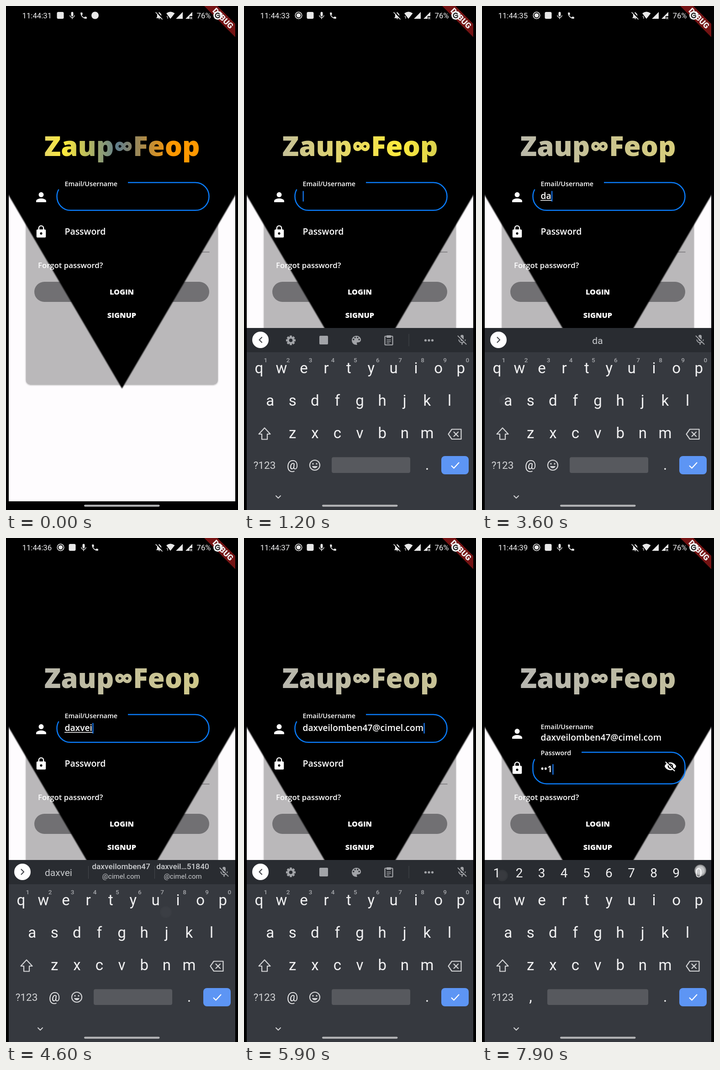
An HTML page for the animation above (8 s loop, 508x1102 px).

```html
<!DOCTYPE html>
<html lang="en">
<head>
<meta charset="utf-8">
<title>Login form</title>
<style>
html, body { margin: 0; width: 100%; height: 100%; overflow: hidden; background: #000; }
svg { display: block; width: 508px; height: 1102px; }
text { white-space: pre; }
.open { font-family: "Open Sans", sans-serif; font-weight: 600; fill: #fff; }
.robo { font-family: Roboto, sans-serif; fill: #f1f1f2; }
.mid { text-anchor: middle; }
.line { fill: none; stroke-linecap: round; stroke-linejoin: round; }
</style>
</head>
<body>
<svg id="stage" viewBox="0 0 508 1102" xmlns="http://www.w3.org/2000/svg"></svg>
<script>
const LOOP = 8000, LETTERS = 'daxvei', USER = 'daxveilomben47', HOST = '@cimel.com';
const KEYS_AT = 250, PICK_AT = 5550, PASS_AT = 6540;
const typedAt = [3060, 3320, 3680, 3880, 4100, 4325];
const digitAt = [7210, 7410, 7635];
const DIGITS = '121';
// x, y, time of touch
const taps = [
  [254, 420, 130], [155, 862, 3000], [50, 862, 3260], [155, 934, 3620], [253, 934, 3820],
  [131, 795, 4040], [350, 818, 4260], [252, 730, 5450], [254, 495, 6440],
  [36, 735, 7150], [82, 735, 7350], [44, 738, 7575], [478, 727, 7800]
];

const icons = {
  mic: 'M12 14c1.66 0 3-1.34 3-3V5c0-1.66-1.34-3-3-3S9 3.34 9 5v6c0 1.66 1.34 3 3 3zm5.3-3c0 3-2.54 5.1-5.3 5.1S6.7 14 6.7 11H5c0 3.41 2.72 6.23 6 6.72V21h2v-3.28c3.28-.48 6-3.3 6-6.72z',
  phone: 'M6.6 10.8c1.44 2.83 3.76 5.14 6.6 6.6l2.2-2.2c.27-.27.67-.36 1-.24 1.12.37 2.33.57 3.6.57.55 0 1 .45 1 1V20c0 .55-.45 1-1 1C10.6 21 3 13.4 3 4c0-.55.45-1 1-1h3.5c.55 0 1 .45 1 1 0 1.25.2 2.45.57 3.57.1.35 0 .74-.25 1z',
  person: 'M12 12a4 4 0 1 0 0-8 4 4 0 0 0 0 8zm0 2c-2.67 0-8 1.34-8 4v2h16v-2c0-2.66-5.33-4-8-4z',
  lock: 'M18 8h-1V6A5 5 0 0 0 7 6v2H6a2 2 0 0 0-2 2v10a2 2 0 0 0 2 2h12a2 2 0 0 0 2-2V10a2 2 0 0 0-2-2zm-6 9a2 2 0 1 1 0-4 2 2 0 0 1 0 4zm3.1-9H8.9V6a3.1 3.1 0 0 1 6.2 0z',
  micOff: 'M19 11h-1.7c0 .74-.16 1.43-.43 2.05l1.23 1.23c.56-.98.9-2.09.9-3.28zm-4 .17V5a3 3 0 0 0-6 0v.18zM4.27 3L3 4.27l6 6V11c0 1.66 1.33 3 3 3l.65-.08 1.66 1.66c-.71.33-1.5.52-2.31.52-2.76 0-5.3-2.1-5.3-5.1H5c0 3.41 2.72 6.23 6 6.72V21h2v-3.28c.91-.13 1.77-.45 2.54-.9L19.73 21 21 19.73z',
  eyeOff: 'M12 7a5 5 0 0 1 4.64 6.83l2.92 2.92A11.8 11.8 0 0 0 23 12c-1.73-4.39-6-7.5-11-7.5-1.4 0-2.74.25-4 .7l2.18 2.16C10.74 7.13 11.35 7 12 7zM2 4.27l2.74 2.74A11.8 11.8 0 0 0 1 12c1.73 4.39 6 7.5 11 7.5 1.55 0 3-.3 4.38-.84L19.73 22 21 20.73 3.27 3zM7.53 9.8l1.55 1.55a3 3 0 0 0 3.57 3.57l1.55 1.55A5 5 0 0 1 7.53 9.8zm4.3-.78l3.16 3.15a3 3 0 0 0-3.15-3.15z',
  bell: 'M12 22a2 2 0 0 0 2-2h-4a2 2 0 0 0 2 2zm6-6v-5c0-3.1-1.6-5.6-4.5-6.3V4a1.5 1.5 0 0 0-3 0v.7C7.6 5.4 6 7.9 6 11v5l-2 2v1h16v-1z',
  palette: 'M12 3a9 9 0 0 0 0 18c.83 0 1.5-.67 1.5-1.5 0-.39-.15-.74-.39-1a1.5 1.5 0 0 1 1.1-2.5H16a5 5 0 0 0 5-5c0-4.4-4-8-9-8z'
};
const place = (x, y, k) => `translate(${x} ${y}) scale(${k}) translate(-12 -12)`;
const icon = (name, x, y, k, fill, id = '') =>
  `<path ${id && `id="${id}"`} d="${icons[name]}" fill="${fill}" fill-rule="evenodd" transform="${place(x, y, k)}"/>`;
const text = (s, x, y, size, cls, more = '') =>
  `<text x="${x}" y="${y}" font-size="${size}" class="${cls}" ${more}>${s}</text>`;
const rect = (x, y, w, h, r, fill, more = '') =>
  `<rect x="${x}" y="${y}" width="${w}" height="${h}" rx="${r}" fill="${fill}" ${more}/>`;
const disc = (x, y, r, fill, more = '') => `<circle cx="${x}" cy="${y}" r="${r}" fill="${fill}" ${more}/>`;
const line = (d, color, w, more = '') => `<path class="line" d="${d}" stroke="${color}" stroke-width="${w}" ${more}/>`;
const group = (id, body, more = '') => `<g id="${id}" ${more}>${body}</g>`;

// outlined field with a gap for its label
function outline(top, bottom, gap) {
  const r = 30, m = top + r;
  return `M${gap} ${top}H414.5A${r} ${r} 0 0 1 444.5 ${m}V${bottom - r}A${r} ${r} 0 0 1 414.5 ${bottom}` +
    `H141.5A${r} ${r} 0 0 1 111.5 ${bottom - r}V${m}A${r} ${r} 0 0 1 115.5 ${m - 15}`;
}

function page() {
  const blue = '#0a7bf8', butt = 'style="stroke-linecap:butt"';
  return rect(6, 400, 496, 683, 0, '#fefcfe') +
    group('body', rect(43.5, 440, 420.5, 388, 10, '#bab8ba', 'filter="url(#shade)"') +
      line('M111 538H445', '#777578', 1.4, 'id="rule"') +
      rect(62, 603, 383, 44, 22, '#717073') +
      '<path d="M0 390V404L254 836.5L508 404V390Z" filter="url(#soft)"/>', 'clip-path="url(#fold)"') +
    text('Zaup∞Feop', 254, 328, 60, 'open mid', 'style="font-weight:800;fill:url(#sheen)"') +
    line(outline(386, 446.8, 267), blue, 2.5, `id="mailBox" ${butt}`) +
    line(outline(468.5, 537.5, 218), blue, 2.5, `id="passBox" ${butt}`) +
    text('Email/Username', 128.5, 394, 14.4, 'open', 'id="mailLabel"') +
    text('Password', 128.5, 500, 19.4, 'open', 'id="passLabel"') +
    text('', 128.5, 422, 19.2, 'open', 'id="mail"') +
    text('', 128.5, 512, 19.2, 'open', 'id="pass"') +
    rect(0, 0, 2.4, 23, 0, '#1673e6', 'id="caret"') +
    line('', '#fff', 1.3, 'id="under"') +
    icon('person', 0, 0, 1, '#fff', 'person') + icon('lock', 0, 0, 1, '#fff', 'lock') +
    icon('eyeOff', 412.5, 499, 1.15, '#fff', 'eye') +
    text('Forgot password?', 70, 573, 16.8, 'open') +
    text('LOGIN', 253.5, 631, 16.2, 'open mid', 'style="font-weight:800"') +
    text('SIGNUP', 253.5, 682, 16.3, 'open mid', 'style="font-weight:800"');
}

function statusBar() {
  const c = '#e9e9e9';
  const app = x => rect(x - 7.5, 13, 15, 15, 3, c);
  return '<path d="M434 0H463L502 39V68Z" fill="#741313"/>' +
    text('DEBUG', 0, 6.2, 17.4, 'robo mid', 'style="font-weight:900" transform="translate(475.3 26.7) rotate(45)"') +
    text('', 35.5, 27, 16.8, 'robo', 'id="clock"') +
    group('early', app(119) + icon('mic', 145, 21, 0.82, c) + icon('phone', 170, 21, 0.76, c) + disc(195, 20.5, 8, c)) +
    group('late', disc(119.5, 20.5, 7.3, 'none', `stroke="${c}" stroke-width="1.6"`) + disc(119.5, 20.5, 4.6, c) +
      app(145) + icon('mic', 170, 21, 0.82, c) + icon('phone', 195, 21, 0.76, c)) +
    icon('bell', 335.5, 21, 0.78, c) + line('M330 13L344 28', '#000', 3) + line('M328 14L342 29', c, 1.6) +
    `<path d="M351 16Q360 9 369.5 16L360 28Z M372 28L387 13V28Z M393 28L408 13V22H402V28Z" fill="${c}"/>` +
    rect(352, 22, 2, 2, 0, c) + rect(353, 25, 2, 2, 0, c) +
    text('R', 403, 29, 8, 'robo', 'style="font-weight:700"') +
    text('76%', 417.5, 27, 16.8, 'robo') +
    disc(463.5, 20.5, 9.5, '#f4f4f4') + line('M467 17A5 5 0 1 0 468 23', '#111', 2.2) +
    line('M463 20.5H468', '#111', 2);
}

function toolbar() {
  const c = '#a2a4a8';
  let teeth = '';
  for (let i = 0; i < 8; i++) teeth += rect(100, 720.5, 5, 6, 1, c, `transform="rotate(${i * 45} 102.5 731)"`);
  const holes = [[-5.5, -1.5], [-2.5, -5.5], [2.5, -5.5], [5.5, -1.5]]
    .map(([x, y]) => disc(246 + x * 1.12, 731 + y * 1.12, 1.7, '#292c31')).join('');
  return teeth + disc(102.5, 731, 5.8, 'none', `stroke="${c}" stroke-width="4"`) +
    rect(165, 721, 19, 19, 2, c) + icon('palette', 246, 731, 1.12, c) + holes +
    rect(308.5, 722, 17, 19, 1, 'none', `stroke="${c}" stroke-width="2.2"`) + rect(312, 720, 10, 5.5, 1, c) +
    line('M313 730H321M313 733.5H321M313 737H318', c, 1.7) +
    rect(360.5, 717, 1, 27, 0, '#45484d') +
    [397.5, 405, 412.5].map(x => disc(x, 731, 2.6, c)).join('');
}

function keyboard() {
  const pitch = 49.1, left = 32.9, soft = '#d3d4d6';
  const row = (s, x, y) => [...s].map((ch, i) => text(ch, x + pitch * i, y, 33, 'robo mid')).join('');
  const nums = (dx, y, size, more) => [...'1234567890']
    .map((ch, i) => text(ch, left + dx + pitch * i, y, size, 'robo mid', more)).join('');
  const hint = (x, s) => text(s, x, 724, 17.3, 'robo mid', 'style="font-weight:500;fill:#c9cbce"') +
    text(HOST, x, 745, 15, 'robo mid', 'style="fill:#c9cbce"');
  return rect(6, 704, 496, 520, 0, '#36393f') + rect(6, 704, 496, 53, 0, '#292c31') +
    group('strip', disc(36, 730, 18, '#fff') + line('', '#44474c', 2.2, 'id="arrow"') +
      icon('micOff', 477.5, 730.5, 1.15, '#a2a4a8') + group('tools', toolbar()) +
      text('', 253, 739, 21, 'robo mid', 'id="guess" style="fill:#c9cbce"') +
      group('hints', hint(252, USER) + hint(387, 'daxveil…51840') +
        rect(180, 717, 1, 28, 0, '#45484d') + rect(325, 717, 1, 28, 0, '#45484d'))) +
    group('digits', nums(-0.5, 741.5, 28, '')) +
    group('marks', nums(14.5, 779, 13.5, 'style="font-weight:500;fill:#a4a6aa"')) +
    row('qwertyuiop', left, 803) + row('asdfghjkl', 57.2, 873.5) + row('zxcvbnm', 106.3, 945) +
    line('M45 922.5L57.5 936H51V947.5H39V936H32.5Z', soft, 2.2) +
    line('M455 925.5H475.5V947H455L447.5 936.2ZM459.5 931.5L469 941M469 931.5L459.5 941', soft, 2.2) +
    text('?123', 45, 1012, 22.5, 'robo mid', 'style="fill:#d3d4d6"') +
    group('mailKeys', text('@', 106, 1013, 27.5, 'robo mid') +
      disc(155, 1004, 11, 'none', `stroke="${soft}" stroke-width="2.2"`) +
      disc(151, 1001, 1.7, soft) + disc(159, 1001, 1.7, soft) +
      `<path d="M149 1006H161A6.2 6.2 0 0 1 149 1006Z" fill="${soft}"/>`) +
    text(',', 106.5, 1014, 33, 'robo mid', 'id="comma"') +
    rect(192, 986.5, 172, 34.5, 4, '#57595e', 'id="space"') + text('.', 401, 1014, 33, 'robo mid') +
    rect(432, 984, 60, 40, 8, '#5d95f4') + line('M454 1005L459.5 1010.5L471 998', '#fff', 2.3, 'style="stroke-linecap:butt"');
}

const stage = document.getElementById('stage');
stage.innerHTML = `<defs>
  <linearGradient id="sheen" gradientUnits="userSpaceOnUse" x1="6" y1="0" y2="0">
    <stop stop-color="#b4b4b4"/><stop offset="33.33%" stop-color="#ffeb3b"/>
    <stop offset="66.67%" stop-color="#607d8b"/><stop offset="100%" stop-color="#ff9800"/>
  </linearGradient>
  <radialGradient id="touch"><stop offset=".55" stop-color="#fff" stop-opacity=".75"/>
    <stop offset=".85" stop-color="#ddd" stop-opacity=".6"/><stop offset="1" stop-color="#222" stop-opacity=".3"/></radialGradient>
  <filter id="shade"><feDropShadow dx="0" dy="1" stdDeviation="1.5" flood-opacity=".3"/></filter>
  <filter id="soft"><feGaussianBlur stdDeviation=".8"/></filter>
  <clipPath id="fold"><rect id="foldBox" x="6" y="400" width="496" height="683"/></clipPath></defs>` +
  rect(0, 0, 508, 1102, 0, '#000') + page() + statusBar() + group('keyboard', keyboard()) +
  line('M70 1071L75 1076L80 1071', '#d3d4d6', 2, 'id="hide"') +
  rect(171, 1090.5, 165.5, 4.2, 2.1, '#b5b6b8') +
  group('taps', taps.map(([x, y]) => disc(x, y, 14, 'url(#touch)')).join(''));

const ui = {};
stage.querySelectorAll('[id]').forEach(el => ui[el.id] = el);
const set = (el, attrs) => { for (const k in attrs) el.setAttribute(k, attrs[k]); };
const show = (el, on) => set(el, { opacity: +on });
const write = (el, s) => { if (el.textContent !== s) el.textContent = s; };
const clamp = v => Math.max(0, Math.min(1, v));
const mix = (a, b, p) => a + (b - a) * p;
const ease = p => 1 - (1 - p) ** 3;
const count = (times, t) => times.filter(at => t >= at).length;

function drawKeyboard(t, typed) {
  const up = ease(clamp((t - KEYS_AT) / 300));
  set(ui.keyboard, { transform: `translate(0 ${112 * (1 - up)})`, opacity: up });
  show(ui.hide, up);
  const numeric = t >= PASS_AT + 60, busy = typed > 0 && t < PICK_AT, many = busy && typed > 3;
  show(ui.strip, !numeric);
  show(ui.digits, numeric);
  show(ui.marks, !numeric);
  show(ui.mailKeys, !numeric);
  show(ui.comma, numeric);
  set(ui.space, numeric ? { x: 143, width: 221 } : { x: 192, width: 172 });
  show(ui.tools, !busy);
  show(ui.hints, many);
  set(ui.arrow, { d: busy ? 'M33.5 724.5L39 730L33.5 735.5' : 'M39 724.5L33.5 730L39 735.5' });
  write(ui.guess, busy ? LETTERS.slice(0, typed) : '');
  set(ui.guess, { x: many ? 115 : 253 });
}

function drawForm(t, typed) {
  const p = ease(clamp((t - PASS_AT) / 200)), inPass = t >= PASS_AT;
  show(ui.mailBox, 1 - p);
  show(ui.passBox, p);
  show(ui.eye, p);
  show(ui.rule, 1 - p);
  set(ui.mailLabel, { y: mix(394, 418, p) });
  set(ui.passLabel, { y: mix(500, 475, p), 'font-size': mix(19.4, 14.4, p) });
  set(ui.mail, { y: mix(422, 443, p) });
  set(ui.person, { transform: place(77, mix(418, 428, p), 1.37) });
  set(ui.lock, { transform: place(77, mix(493.5, 503, p), 1.28) });

  const n = count(digitAt, t);
  write(ui.mail, t < PICK_AT ? LETTERS.slice(0, typed) : USER + HOST);
  write(ui.pass, n ? '•'.repeat(n - 1) + DIGITS[n - 1] : '');
  const width = (inPass ? ui.pass : ui.mail).getComputedTextLength();
  const end = 128.5 + width;
  set(ui.under, { d: typed && t < PICK_AT ? `M128.5 425H${end}` : '' });

  // blinking restarts with every edit
  const last = Math.max(...[150, PICK_AT, PASS_AT, ...typedAt, ...digitAt].filter(at => t >= at));
  show(ui.caret, t >= 150 && (t - last) % 1000 < 500);
  set(ui.caret, { x: end + (width ? 0.3 : 0), y: inPass ? 494.5 : 404.5 });
}

function draw(t) {
  const typed = count(typedAt, t), sec = t / 1000;
  set(ui.sheen, { x2: 6 + 3 * (119 + 165 * sec + 14 * sec * sec) });
  write(ui.clock, '11:44:' + (31 + Math.floor((t + 850) / 1000)));
  show(ui.early, t < 150);
  show(ui.late, t >= 150);
  set(ui.foldBox, { height: t < KEYS_AT ? 683 : 304 });
  drawForm(t, typed);
  drawKeyboard(t, typed);
  taps.forEach(([, , at], i) => {
    const age = t - at;
    show(ui.taps.children[i], age < 0 ? 0 : clamp((350 - age) / 250));
  });
}

const start = performance.now();
function tick() {
  draw((performance.now() - start) % LOOP);
  requestAnimationFrame(tick);
}
tick();
</script>
</body>
</html>
```
